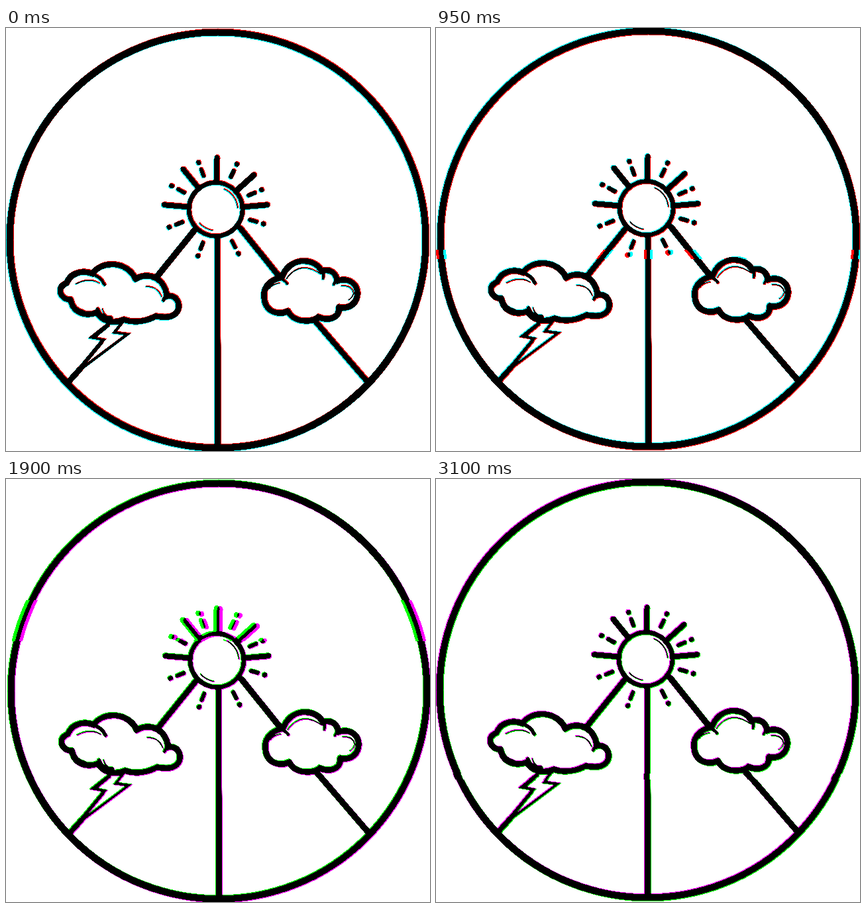
These frames come from a looping animation (640x639 px, 3.15 s). An HTML page with a canvas:

```html
<!DOCTYPE html>
<html lang="en">
<head>
<meta charset="utf-8">
<title>Weather peace sign</title>
<style>
html, body { margin: 0; width: 100%; height: 100%; overflow: hidden; background: #fff; }
canvas { display: block; width: 100vw; height: 100vh; }
</style>
</head>
<body>
<canvas id="stage" width="640" height="639"></canvas>
<script>
const W = 640, H = 639, LOOP = 3150, TICK = 50, STEP = 70.5;
const SUN = { x: 317, y: 273.5, r: 40.5 };
const ctx = document.getElementById('stage').getContext('2d');
const rad = deg => deg * Math.PI / 180;

function layer() {
  const c = document.createElement('canvas');
  c.width = W;
  c.height = H;
  const g = c.getContext('2d');
  g.fillStyle = '#fff';
  g.fillRect(0, 0, W, H);
  return g;
}

const art = layer();
art.lineCap = art.lineJoin = 'round';
art.translate(1, 0);

function line(width, x1, y1, x2, y2) {
  art.lineWidth = width;
  art.beginPath();
  art.moveTo(x1, y1);
  art.lineTo(x2, y2);
  art.stroke();
}

function arc(width, x, y, r, from = 0, to = 360) {
  art.lineWidth = width;
  art.beginPath();
  art.arc(x, y, r, rad(from), rad(to));
  art.stroke();
}

function curve(width, d, filled) {
  const p = new Path2D(d);
  art.lineWidth = width;
  art.fillStyle = '#fff';
  if (filled) art.fill(p);
  art.stroke(p);
}

function ray(width, deg, from, to) {
  const c = Math.cos(rad(deg)), s = Math.sin(rad(deg));
  line(width, SUN.x + from * c, SUN.y + from * s, SUN.x + to * c, SUN.y + to * s);
}

function drawSign() {
  arc(11, 320, 320, 314);
  // the ring is blunt where it meets the stage edges
  for (let i = 0; i < 4; i++) {
    const c = Math.cos(i * Math.PI / 2), s = Math.sin(i * Math.PI / 2);
    line(6, 320 + 316 * c - 11 * s, 320 + 316 * s - 11 * c, 320 + 316 * c + 11 * s, 320 + 316 * s + 11 * c);
  }
  line(9.5, 319.5, 316, 320, 630);
  line(9.5, 285, 305, 226, 378);
  line(9.5, 354, 302, 412, 374);
  line(9.5, 466, 441, 546, 534);
}

function drawSun() {
  const { x, y, r } = SUN;
  for (const a of [-88.5, -129, -42, 185, -5]) ray(9, a, r, 78);
  for (const a of [17, 63, 111, 159, 208, 250, 295, 337]) {
    ray(7, a, 54, 64);
    ray(8, a, 75, 75.5);
  }
  arc(7.5, x, y, r);
  arc(2, x, y, 33, -68, -4);
  arc(2, x, y, 32, 98, 140);
}

function drawBolt() {
  art.lineJoin = 'miter';
  curve(4.5, 'M154 447L129 467L148 470.5L108 519L184 462L164 459.5L177 443', true);
  line(6, 154, 449, 137, 463);
  line(6, 144, 475, 110, 516);
  line(9, 95, 534, 112, 515);
  art.lineJoin = 'round';
}

function drawClouds() {
  curve(9.5, 'M131 371C143 351 183 350 196 379C212 367 241 376 243 405' +
    'C257 401 265 416 259 428C252 438 240 437 226 435C214 442 195 446 178 440' +
    'C163 447 144 443 138 429C122 436 102 431 98 410C81 410 76 390 92 385C98 368 118 365 131 371Z', true);
  curve(5.5, 'M127 370Q143 374 149 387M243 404Q239 407 238 411M139 424Q143 437 159 437');
  curve(2, 'M106 386Q126 376 141 385M212 390Q229 390 235 405M97 409Q104 423 119 427M146 424Q147 430 152 434');

  curve(9.5, 'M417 376C427 346 465 344 477 367C488 362 500 370 500 382' +
    'C514 376 530 383 531 400C531 415 519 425 503 421C505 438 486 443 472 436' +
    'C462 446 432 444 426 427C411 435 391 428 390 406C388 389 402 379 417 376Z', true);
  curve(4.5, 'M413 378Q421 380 425 386M478 369Q481 374 479 378M500 381Q496 383 495 387');
  curve(2, 'M424 378Q444 350 475 371M398 393Q403 386 413 385M507 389Q523 388 525 401Q523 407 518 410');
}

drawSign();
drawSun();
drawBolt();
drawClouds();

// one hard-edged plate per colour channel
const plates = ['#0ff', '#f0f', '#ff0'].map(ink => {
  const g = layer();
  g.filter = 'contrast(40)';
  g.drawImage(art.canvas, 0, 0);
  g.filter = 'none';
  g.globalCompositeOperation = 'lighten';
  g.fillStyle = ink;
  g.fillRect(0, 0, W, H);
  return g.canvas;
});

// torn strips, in the order they appear
const strips = [
  { top: 335, height: 14, push: -2, split: 4 },
  { top: 183, height: 62, push: -2, split: 5 },
  { top: 308, height: 33, push: 3, split: -4 },
  { top: 445, height: 9, push: -2, split: -1 }
];

function print(channel, x, y, splitX, splitY, top = 0, height = H) {
  ctx.save();
  ctx.beginPath();
  ctx.rect(0, top, W, height);
  ctx.clip();
  ctx.fillStyle = '#fff';
  ctx.fillRect(0, top, W, height);
  ctx.globalCompositeOperation = 'multiply';
  plates.forEach((p, i) => {
    const moved = i === channel;
    ctx.drawImage(p, moved ? x + splitX : x, moved ? y + splitY : y);
  });
  ctx.restore();
}

// the jitter comes from cycles of different length
function draw(k) {
  const channel = Math.round(k % 12 / 6);
  const up = k % 3 === 2;
  const x = k % 11 ? 0 : -1, y = up ? -1 : 0;
  const splitX = k % 11 < 4 ? -1 : 1, splitY = up ? -1 : 1;
  print(channel, x, y, splitX, splitY);
  if (k % 18 > 7) {
    const s = strips[Math.round(k / 12) - 1];
    print(channel, s.push, y, s.split, splitY, s.top, s.height);
  }
}

const start = performance.now();
let shown = -1;

function frame() {
  const t = (performance.now() - start) % LOOP;
  const k = Math.ceil(TICK * (Math.floor(t / TICK) + 1) / STEP) - 1;
  if (k !== shown) draw(shown = k);
  requestAnimationFrame(frame);
}
frame();
</script>
</body>
</html>
```
